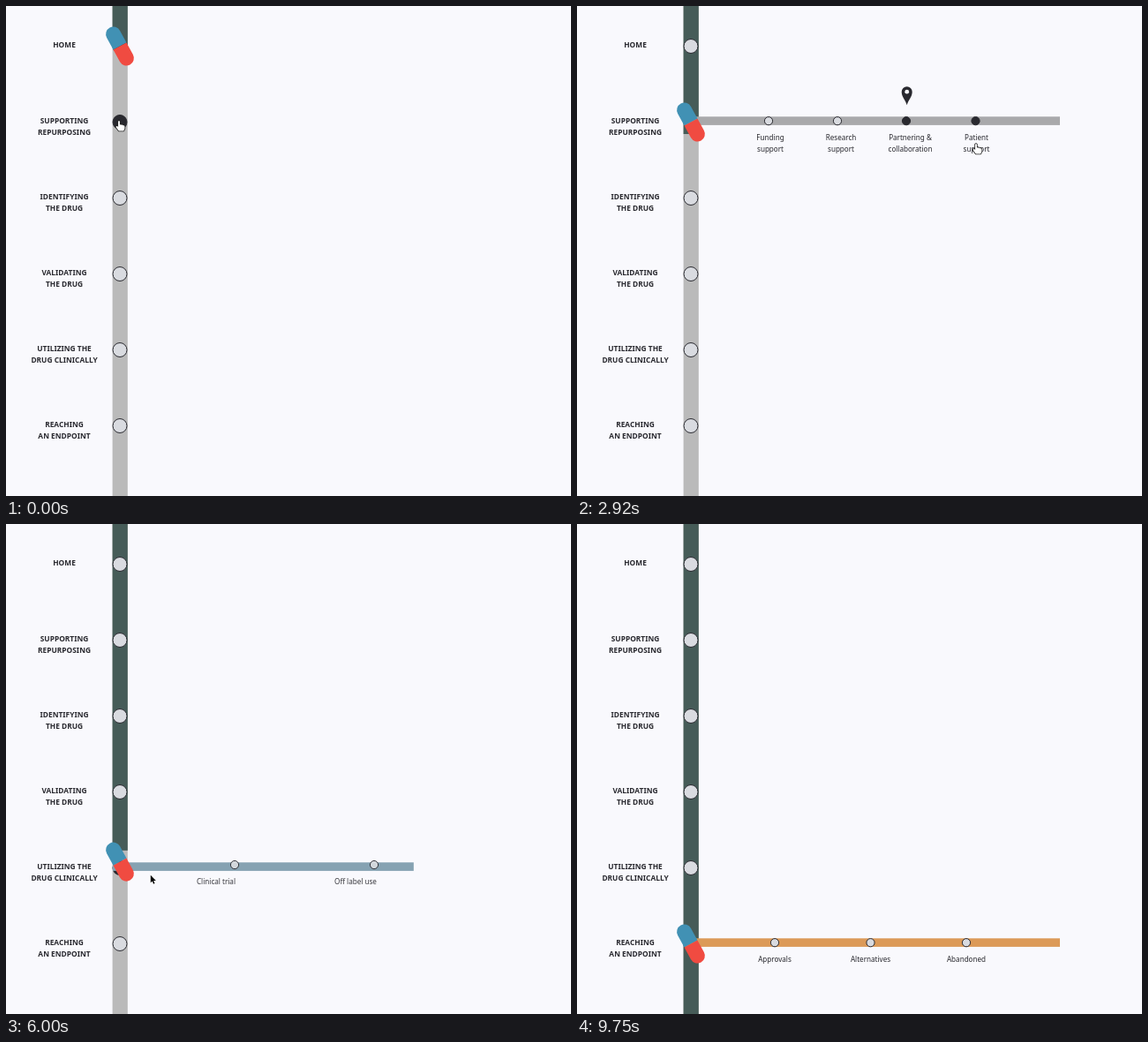
Animation of 640x555 px, one loop 9830 ms. Source, as an HTML page with a canvas:

```html
<!DOCTYPE html>
<html lang="en">
<head>
<meta charset="utf-8">
<style>
html, body { margin: 0; width: 100%; height: 100%; overflow: hidden; background: #f9f9fd; }
canvas { display: block; width: 640px; height: 555px; }
</style>
</head>
<body>
<canvas id="stage"></canvas>
<script>
const LOOP = 9830, FPS = 12, MOVE = 500;
const INK = '#29292f', PAPER = '#f9f9fd', PALE = '#d9dbe0';
const AXIS = 129, GAP = 86;

const item = (x, label, textX = x, drop = 0) => ({ x, lines: label.split('|'), textX, drop });

// start: when the stop is clicked; fill: how far the dark track reaches
const stops = [
  { title: 'HOME', start: -MOVE, fill: 45, items: [] },
  { title: 'SUPPORTING|REPURPOSING', start: 250, fill: 145, color: '#a9a9ab', items: [
    item(217, 'Funding|support', 219), item(295, 'Research|support', 299),
    item(373, 'Partnering &|collaboration', 377.5), item(451.5, 'Patient|support', 452.5)] },
  { title: 'IDENTIFYING|THE DRUG', start: 3870, fill: 225, color: '#40a65a', items: [
    item(217, 'Drug screen|approach', 216.5, 25), item(283, 'Pathogenesis targeting|approach', 283, 123),
    item(349, 'Data from similar|diseases approach', 349, 25), item(415, 'Computational|approach', 415, 123),
    item(481.5, 'Data from off label use|approach', 481, 25)] },
  { title: 'VALIDATING|THE DRUG', start: 4722, fill: 293, color: '#df4545', items: [
    item(217, 'In vivo', 196), item(318.5, 'In vitro', 297), item(420, 'Evaluation of|RWE', 398.5)] },
  { title: 'UTILIZING THE|DRUG CLINICALLY', start: 5600, fill: 389, color: '#86a2b2', items: [
    item(259, 'Clinical trial', 238), item(417, 'Off label use', 396)] },
  { title: 'REACHING|AN ENDPOINT', start: 7970, fill: 600, color: '#dc9a58', items: [
    item(224, 'Approvals'), item(332.5, 'Alternatives'), item(441, 'Abandoned')] }
];

// time, x, y of the pointer tip
const path = [
  [0, 128, 130], [500, 128, 130], [1000, 215, 152], [1450, 215, 152], [1700, 289, 156],
  [2050, 289, 156], [2300, 374, 156], [2600, 374, 156], [2850, 452, 156], [3150, 452, 156],
  [3700, 126, 218], [3950, 126, 218], [4500, 128, 303], [4750, 128.5, 303], [5330, 129, 390],
  [5650, 128, 390], [6500, 225, 411], [7200, 225, 411], [7750, 128, 474], [8000, 128, 474],
  [8420, 214, 437], [9200, 660, 250], [LOOP, 660, 250]
];

const canvas = document.getElementById('stage');
const ctx = canvas.getContext('2d');
const ratio = window.devicePixelRatio || 1;
canvas.width = 640 * ratio;
canvas.height = 555 * ratio;

const mix = (a, b, k) => a + (b - a) * k;
const nodeY = i => 45.5 + GAP * i;
const branchY = i => 44.2 + GAP * i;

function rect(x, y, w, h, color) {
  ctx.fillStyle = color;
  ctx.fillRect(x, y, w, h);
}

function dot(x, y, r, fill) {
  ctx.beginPath();
  ctx.arc(x, y, r, 0, 7);
  ctx.fillStyle = fill;
  ctx.fill();
  ctx.strokeStyle = INK;
  ctx.lineWidth = 1;
  ctx.stroke();
}

function text(lines, x, y, font) {
  ctx.font = font + ' "Noto Sans", sans-serif';
  ctx.fillStyle = INK;
  lines.forEach((line, i) => ctx.fillText(line, x, y + i * 13.2));
}

function pointerAt(t) {
  const i = Math.max(1, path.findIndex(p => p[0] > t));
  const [t0, x0, y0] = path[i - 1], [t1, x1, y1] = path[i];
  const k = (t - t0) / (t1 - t0), s = k * k * (3 - 2 * k);
  return { x: mix(x0, x1, s), y: mix(y0, y1, s) };
}

function hoveredItem(t, current) {
  const { x, y } = pointerAt(t), dy = y - branchY(current);
  return stops[current].items.findIndex(it => Math.abs(x - it.textX) < 28 && dy > 0 && dy < 40);
}

function drawPin(x, y) {
  ctx.fillStyle = INK;
  ctx.beginPath();
  ctx.moveTo(x, y - 18);
  ctx.bezierCurveTo(x - 1.5, y - 24, x - 6, y - 27, x - 6, y - 33);
  ctx.arc(x, y - 33, 6, Math.PI, 0);
  ctx.bezierCurveTo(x + 6, y - 27, x + 1.5, y - 24, x, y - 18);
  ctx.fill();
  ctx.beginPath();
  ctx.arc(x, y - 33, 2.4, 0, 7);
  ctx.fillStyle = PAPER;
  ctx.fill();
}

function drawBranch(i, grow, ease, t) {
  const { color, items } = stops[i];
  const hover = hoveredItem(t, i), pinned = hoveredItem(t - 250, i);
  const y = branchY(i) - 27 * (1 - ease);
  rect(121, branchY(i) - 4.9, 426 * grow, 9.6, color);
  ctx.globalAlpha = ease;
  items.forEach((it, n) => {
    if (it.drop) rect(it.x - 1.2, y + 5, 2.4, it.drop - 5, color);
    dot(it.x, y, 4.6, n === hover || n === pinned ? INK : PALE);
    text(it.lines, it.textX, y + 22 + (it.drop && it.drop - 1), '8.1px');
    if (n === pinned) drawPin(it.x + .7, y);
  });
  ctx.globalAlpha = 1;
}

function drawPill(y) {
  ctx.save();
  ctx.translate(AXIS, y);
  ctx.rotate(-.5);
  const half = (angle, dy, color) => {
    ctx.beginPath();
    ctx.arc(0, dy, 8.5, angle, angle + Math.PI);
    ctx.lineTo(-Math.sign(dy) * 8.5, 0);
    ctx.lineTo(Math.sign(dy) * 8.5, 0);
    ctx.fillStyle = color;
    ctx.fill();
  };
  half(Math.PI, -15.4, '#4191b4');
  half(0, 15.4, '#f04b41');
  ctx.restore();
}

const arrow = new Path2D('M0 0V9.3L2.1 7.4L3.6 10.8L5.1 10.1L3.6 6.8H6.6Z');
const hand = new Path2D('M-1 .8Q0-.8 1 .8V5Q2.2 3.9 3 5.2Q4.4 4.4 5 5.8Q6.8 5.2 7 7V9.5L5.7 12.5H-.2L-3.7 7.8Q-3.6 5.9-1.8 6.8L-1 7.6Z');

function drawPointer({ x, y }, isHand) {
  const shape = isHand ? hand : arrow;
  ctx.save();
  ctx.translate(x, y);
  ctx.scale(.92, .92);
  ctx.lineWidth = isHand ? 1.8 : 1;
  ctx.strokeStyle = isHand ? '#222' : '#fff';
  ctx.fillStyle = isHand ? '#fff' : '#000';
  ctx.lineJoin = 'round';
  ctx.stroke(shape);
  ctx.fill(shape);
  ctx.restore();
}

function draw(t) {
  ctx.setTransform(ratio, 0, 0, ratio, 0, 0);
  ctx.textAlign = 'center';
  rect(0, 0, 640, 555, PAPER);

  const current = stops.findLastIndex(s => s.start <= t);
  const last = Math.max(0, current - 1);
  const grow = Math.min(1, (t - stops[current].start) / MOVE);
  const ease = 1 - (1 - grow) ** 1.57;
  const pointer = pointerAt(t);
  const overNode = stops.findIndex((s, i) =>
    Math.abs(pointer.x - AXIS) < 9 && Math.abs(pointer.y - nodeY(i)) < 9);

  rect(120.6, 0, 17.2, 555, '#bababa');
  rect(120.6, 0, 17.2, mix(stops[last].fill, stops[current].fill, grow), '#465c58');
  stops.forEach((s, i) => {
    dot(AXIS, nodeY(i), 8, i === current || i === overNode ? INK : PALE);
    text(s.title.split('|'), 66, 47.2 + GAP * i, '600 8.4px');
  });

  if (current) drawBranch(current, grow, ease, t);
  drawPill(mix(nodeY(last), nodeY(current), ease));
  const onItem = hoveredItem(t, current) >= 0;
  drawPointer(pointer, grow === 1 && (overNode >= 0 || onItem));
}

function tick() {
  const t = performance.now() % LOOP;
  draw(Math.floor((t + 8) * FPS / 1000) * 1000 / FPS % LOOP);
  requestAnimationFrame(tick);
}
tick();
</script>
</body>
</html>
```
